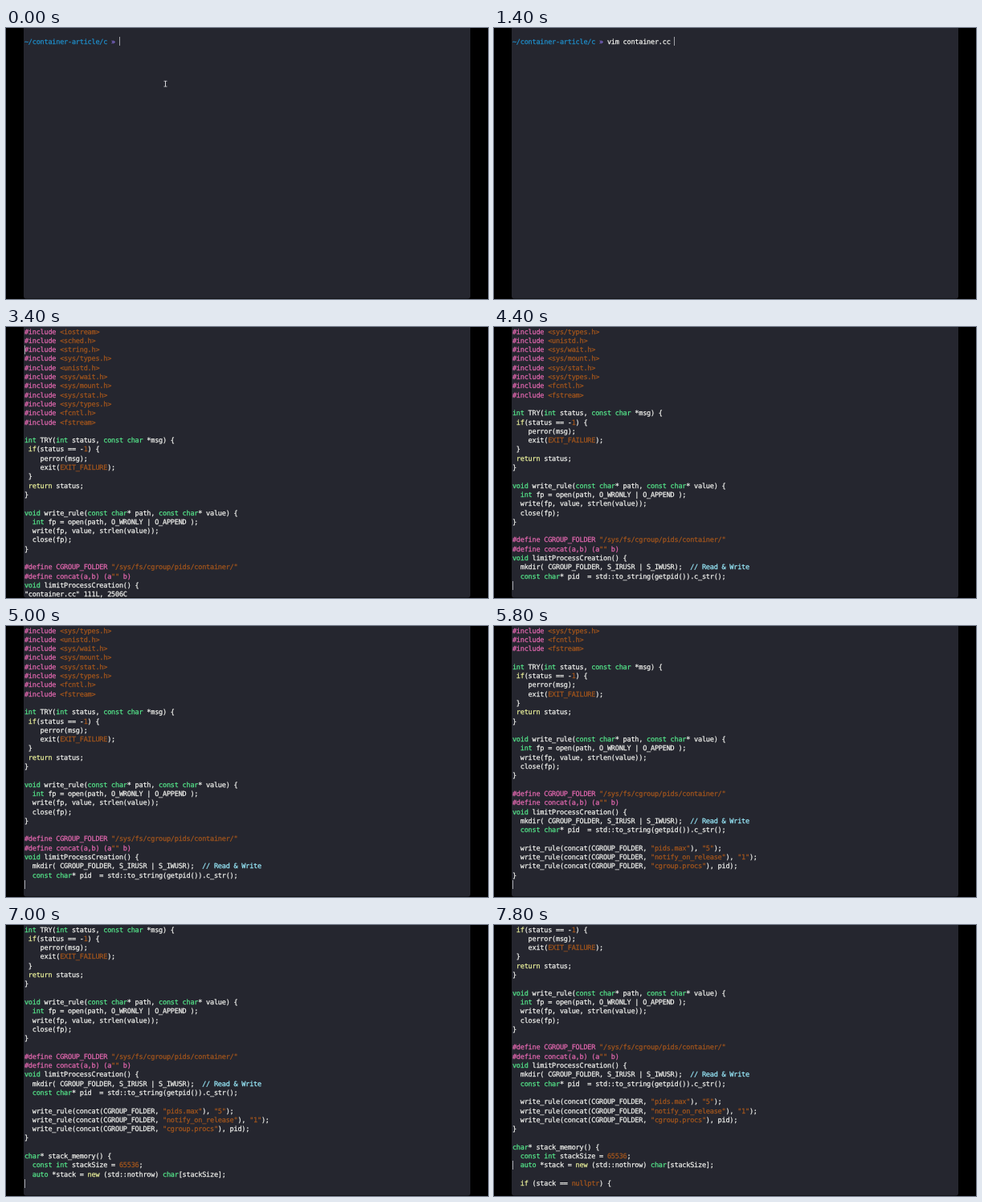
Recreate the animation shown at these times as an HTML page with a canvas. Size 600 by 338 pixels, loop 8000 ms.

```html
<!DOCTYPE html>
<html>
<head>
<meta charset="utf-8">
<style>
html, body { margin: 0; width: 100%; height: 100%; overflow: hidden; background: #000; }
canvas { display: block; }
</style>
</head>
<body>
<canvas id="stage" width="600" height="338"></canvas>
<script>
const ctx = document.getElementById('stage').getContext('2d');
const LOOP = 8000, LEFT = 23, CELL = 4.917, ROW = 11.3, ROWS = 29;
const COLOR = {
  back: '#25262f', text: '#f1f2ee', macro: '#e468b0', literal: '#a4561c', type: '#55e68a',
  keyword: '#eaf09a', comment: '#9aedfe', path: '#1f8fcb', arrow: '#8a70e0', cursor: '#a2a3a8'
};

const headers = ['iostream', 'sched.h', 'string.h', 'sys/types.h', 'unistd.h', 'sys/wait.h',
  'sys/mount.h', 'sys/stat.h', 'sys/types.h', 'fcntl.h', 'fstream'];
const source = headers.map(h => `#include <${h}>`).concat(`
int TRY(int status, const char *msg) {
 if(status == -1) {
    perror(msg);
    exit(EXIT_FAILURE);
 }
 return status;
}

void write_rule(const char* path, const char* value) {
  int fp = open(path, O_WRONLY | O_APPEND );
  write(fp, value, strlen(value));
  close(fp);
}

#define CGROUP_FOLDER "/sys/fs/cgroup/pids/container/"
#define concat(a,b) (a"" b)
void limitProcessCreation() {
  mkdir( CGROUP_FOLDER, S_IRUSR | S_IWUSR);  // Read & Write
  const char* pid  = std::to_string(getpid()).c_str();

  write_rule(concat(CGROUP_FOLDER, "pids.max"), "5");
  write_rule(concat(CGROUP_FOLDER, "notify_on_release"), "1");
  write_rule(concat(CGROUP_FOLDER, "cgroup.procs"), pid);
}

char* stack_memory() {
  const int stackSize = 65536;
  auto *stack = new (std::nothrow) char[stackSize];

  if (stack == nullptr) {`.split('\n'));

// [time, value] steps
const typing = [[0, ''], [200, 'v'], [400, 'vi'], [600, 'vim '], [800, 'vim c'],
  [1000, 'vim con'], [1200, 'vim container.'], [1400, 'vim container.cc ']];
const EDITOR_OPENS = 1600;
const cursorLine = [[0, 0], [3000, 1], [3400, 2], [3600, 11], [3800, 19], [4200, 25],
  [4400, 31], [5200, 36], [7000, 40], [7400, 41], [7600, 40], [7800, 39]];

const reached = (steps, t) => steps.filter(s => s[0] <= t).map(s => s[1]);

function tokenize(line) {
  const base = line[0] === '#' ? COLOR.macro : COLOR.text;
  const rules = [
    [/^\/\/.*/, COLOR.comment],
    [/^("[^"]*"|<[\w./]+>)/, COLOR.literal],
    [/^(\d+|EXIT_FAILURE|nullptr)\b/, COLOR.literal],
    [/^(int|const|char|void|auto)\b/, COLOR.type],
    [/^(if|return|new)\b/, COLOR.keyword],
    [/^(\w+|[^\w])/, base]
  ];
  const tokens = [];
  while (line) {
    const [pattern, color] = rules.find(r => r[0].test(line));
    const word = line.match(pattern)[0];
    tokens.push([word, color]);
    line = line.slice(word.length);
  }
  return tokens;
}
const code = source.map(tokenize);

function drawTokens(tokens, row) {
  let col = 0;
  const y = 8.5 + row * ROW;
  for (const [word, color] of tokens) {
    ctx.fillStyle = ctx.strokeStyle = color;
    for (const ch of word) {
      const x = LEFT + (col + 0.5) * CELL;
      if (ch !== ' ') {
        ctx.fillText(ch, x, y);
        ctx.strokeText(ch, x, y);
      }
      col++;
    }
  }
  return col;
}

function drawCursor(col, row) {
  ctx.fillStyle = COLOR.cursor;
  ctx.fillRect(Math.round(LEFT + col * CELL - 0.4), Math.round(row * ROW + 0.15), 1, 11);
}

function drawPointer() {
  ctx.fillStyle = '#d8d8dc';
  ctx.fillRect(198, 66, 1, 7);
  ctx.fillRect(196.5, 65.8, 4, 0.8);
  ctx.fillRect(196.5, 72.6, 4, 0.8);
}

function drawShell(t) {
  const typed = reached(typing, t).pop();
  const col = drawTokens([['~/container-article/c ', COLOR.path], ['» ', COLOR.arrow], [typed, COLOR.text]], 1);
  drawCursor(col, 1);
  if (t < typing[1][0]) drawPointer();
}

function drawEditor(t) {
  const visited = reached(cursorLine, t);
  const top = Math.max(0, Math.max(...visited) - ROWS + 1);
  code.slice(top, top + ROWS).forEach(drawTokens);
  if (top === 0) drawTokens([['"container.cc" 111L, 2506C', COLOR.text]], ROWS);
  drawCursor(0, visited.pop() - top);
}

function draw() {
  const t = performance.now() % LOOP;
  ctx.fillStyle = '#000';
  ctx.fillRect(0, 0, 600, 338);
  ctx.fillStyle = COLOR.back;
  ctx.beginPath();
  ctx.roundRect(22, -6, 556, 343.6, 3);
  ctx.fill();
  ctx.font = '8.5px "DejaVu Sans Mono", monospace';
  ctx.textRendering = 'geometricPrecision';
  ctx.textAlign = 'center';
  ctx.lineWidth = 0.25;
  ctx.lineJoin = 'round';
  (t < EDITOR_OPENS ? drawShell : drawEditor)(t);
  requestAnimationFrame(draw);
}
draw();
</script>
</body>
</html>
```
